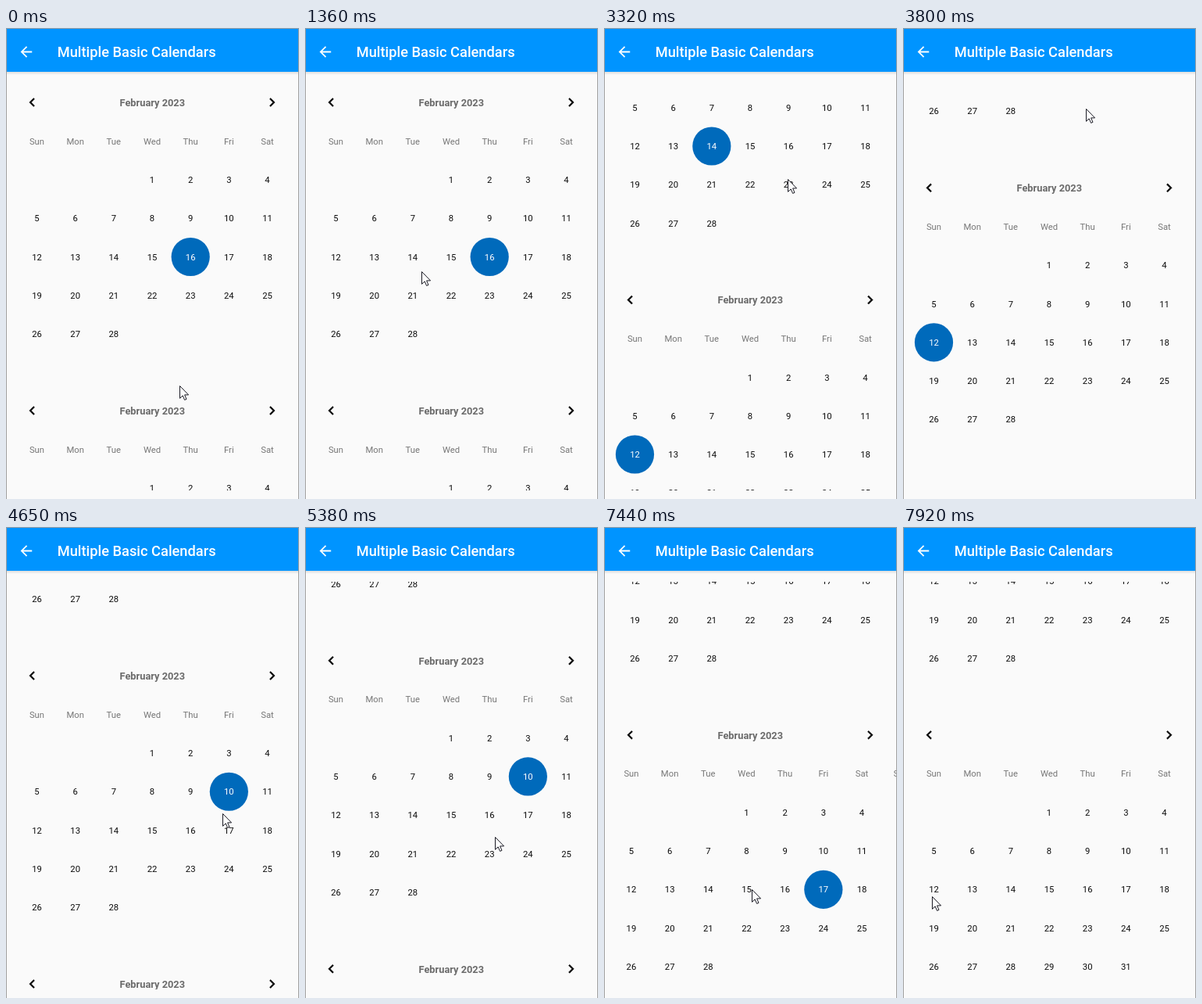
Write an HTML page that moves like this. It is 375 px wide and 602 px high and loops after 8000 ms.

```html
<!DOCTYPE html>
<html lang="en">
<head>
<meta charset="utf-8">
<title>Calendars</title>
<style>
  html, body { margin: 0; width: 100%; height: 100%; overflow: hidden; background: #fafafa; }
  svg { display: block; width: 375px; height: 602px; font-family: Roboto, sans-serif; }
  .title { font-size: 18.25px; font-weight: 500; fill: #fff; }
  .month { font-size: 12.8px; font-weight: 700; fill: #6b6b6b; }
  .month, .name, .day { text-anchor: middle; }
  .name, .day { font-size: 11.3px; }
  .name { fill: #777; }
  .day { fill: #0c0c0c; }
  .day.on { fill: #fff; }
  .disc { fill: #006abb; }
</style>
</head>
<body>
<svg viewBox="0 0 375 602">
  <defs>
    <clipPath id="view"><rect x="1" y="70" width="373" height="521"/></clipPath>
    <clipPath id="page"><rect x="14" y="0" width="346" height="602"/></clipPath>
    <linearGradient id="shade" x2="0" y2="1">
      <stop offset="0" stop-color="#000" stop-opacity=".12"/>
      <stop offset="1" stop-color="#000" stop-opacity="0"/>
    </linearGradient>
  </defs>
  <rect width="375" height="602" fill="#fafafa"/>
  <g clip-path="url(#view)"><g id="list"></g></g>
  <rect y="56" width="375" height="4" fill="url(#shade)"/>
  <rect width="375" height="56" fill="#0094ff"/>
  <path transform="translate(15 19.5) scale(.914)" fill="#fff"
    d="M20 11H7.83l5.59-5.59L12 4l-8 8 8 8 1.41-1.41L7.83 13H20z"/>
  <text class="title" x="65.7" y="37">Multiple Basic Calendars</text>
  <path d="M.5 602V.5H374.5V602" fill="none" stroke="#a0a0a0"/>
  <path id="cursor" fill="#fff" stroke="#1a1a24" stroke-linejoin="round"
    d="M.5 .5V16.3L4.2 12.9L6.6 18.4L9 17.4L6.6 11.9H11.6Z"/>
</svg>
<script>
const LOOP = 8000, LEAD = 250, TICK = 121.5;
const COL = 49.17, ROW = 49.25, CAL = 394, PAGE = 345, LEFT = 39.5;

// Each leg eases to its values between two ticks: [from, to, ...values].
const pointer = [[0, 0, 222, 457],
  [0, 5, 131, 293], [6, 7, 139, 296],       // tap a day
  [9, 14, 233, 438], [14, 16, 236, 418],
  [18.7, 30, 234, 103],                     // drag up
  [30, 34, 283, 339], [36, 40, 243, 514],   // tap, step back
  [40.3, 47, 243, 184],                     // drag up
  [47.3, 53, 277, 471],                     // tap
  [57.2, 60, 189, 463], [60, 64, 37, 472]]; // swipe left
const scroll = [[0, 0, 0], [21, 31.37, 299], [42.26, 47.2, 617.2]];
const swipe = [[0, 0, 0], [59.71, 64, PAGE]];

// Selected day of each calendar and the tick at which it changes.
const picks = [
  { before: 16, after: 14, tick: 18 },
  { before: 12, after: 10, tick: 37 },
  { before: 12, after: 17, tick: 56 }
];

const list = document.getElementById("list");
const cursor = document.getElementById("cursor");
const labels = [];

function add(parent, tag, attrs) {
  const el = document.createElementNS("http://www.w3.org/2000/svg", tag);
  for (const key in attrs) el.setAttribute(key, attrs[key]);
  return parent.appendChild(el);
}

function label(parent, type, x, y, text) {
  const el = add(parent, "text", { class: type, x });
  el.textContent = text;
  labels.push({ el, y });
  return el;
}

function move(el, x, y) {
  el.setAttribute("transform", `translate(${x} ${y})`);
}

// Both months shown start on a Wednesday.
const place = day => ({
  x: LEFT + (day + 2) % 7 * COL,
  y: 194 + Math.floor((day + 2) / 7) * ROW
});

function addMonth(parent, days, top) {
  ["Sun", "Mon", "Tue", "Wed", "Thu", "Fri", "Sat"].forEach((name, i) =>
    label(parent, "name", LEFT + i * COL, top + 148.6, name));
  return Array.from({ length: days }, (_, i) => {
    const { x, y } = place(i + 1);
    return label(parent, "day", x, top + y + 4.1, i + 1);
  });
}

function addChevron(x, y, flip) {
  add(list, "path", {
    d: "M15.41 7.41L14 6l-6 6 6 6 1.41-1.41L10.83 12z", stroke: "#000", "stroke-width": .5,
    transform: `translate(${x} ${y}) scale(${.914 * flip} .914)`
  });
}

const calendars = picks.map((pick, i) => {
  const top = i * CAL;
  const month = label(list, "month", 187.3, top + 100, "February 2023");
  addChevron(22.5, top + 84.1, 1);
  addChevron(351.5, top + 84.1, -1);
  const pages = add(list, "g");
  const disc = add(pages, "circle", { class: "disc", r: 24.6 });
  const cells = addMonth(pages, 28, top);
  return { top, month, pages, disc, cells };
});
const last = calendars[2];
const next = add(last.pages, "g");
addMonth(next, 31, last.top);
move(next, PAGE, 0);

const ease = f => f * f * (3 - 2 * f);

function follow(legs, tick) {
  let now = legs[0].slice(2);
  for (const [from, to, ...goal] of legs.slice(1)) {
    if (tick <= from) break;
    const f = ease(Math.min(1, (tick - from) / (to - from)));
    now = now.map((v, i) => v + (goal[i] - v) * f);
  }
  return now;
}

function select(cal, day) {
  const { x, y } = place(day);
  cal.disc.setAttribute("cx", x);
  cal.disc.setAttribute("cy", cal.top + y);
  cal.cells.forEach((cell, i) => cell.classList.toggle("on", i + 1 === day));
}

function draw(tick) {
  const [x, y] = follow(pointer, tick);
  const [offset] = follow(scroll, tick);
  const [slide] = follow(swipe, tick);
  move(cursor, Math.round(x), Math.round(y));
  move(list, 0, -offset);
  // Baselines sit on whole pixels while the list scrolls.
  for (const { el, y } of labels) el.setAttribute("y", Math.round(y - offset) + offset);
  picks.forEach((p, i) => select(calendars[i], tick < p.tick ? p.before : p.after));
  move(last.pages, -slide, 0);
  last.month.style.visibility = slide < PAGE ? "visible" : "hidden";
}

const begin = performance.now();
function frame() {
  const t = (performance.now() - begin) % LOOP;
  draw(Math.max(0, Math.floor((t - LEAD) / TICK) + 1));
  requestAnimationFrame(frame);
}
frame();
</script>
</body>
</html>
```
